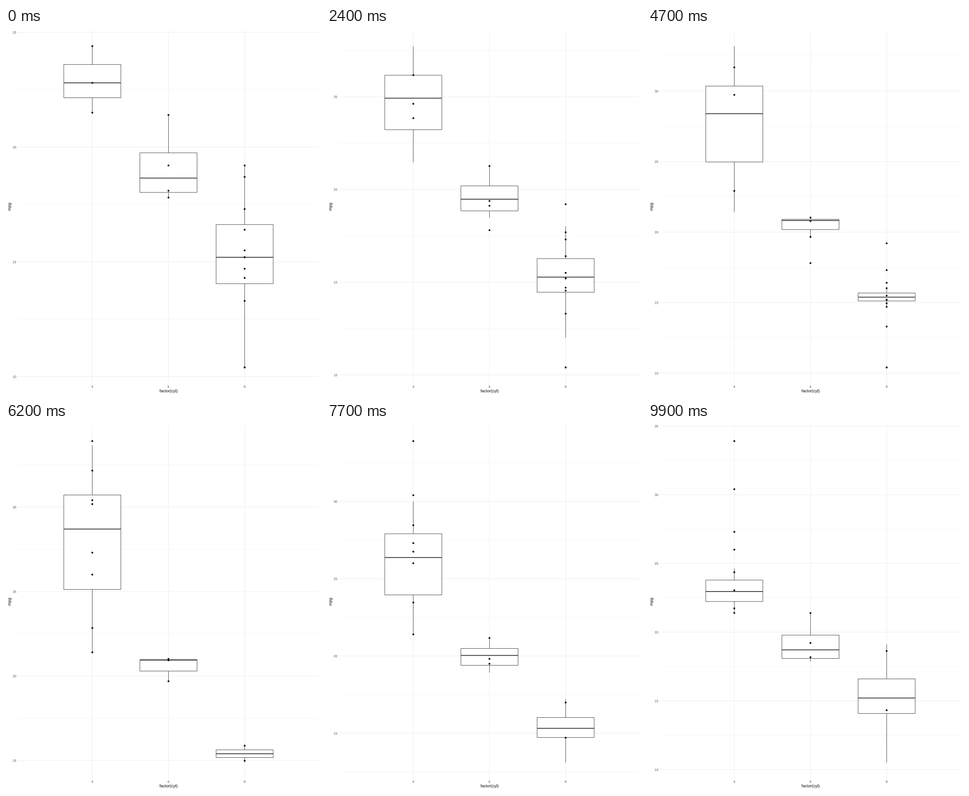
Write a matplotlib script that moves like this. It is 693 px wide and 808 px high and loops after 10 s.

```python
import numpy as np
import matplotlib.pyplot as plt
from matplotlib.animation import FuncAnimation
from matplotlib.patches import Circle, PathPatch, Rectangle
from matplotlib.textpath import TextPath
from matplotlib.transforms import Affine2D

plt.rcParams["path.snap"] = False

W, H, DPI = 693, 808, 64
FRAMES, INTERVAL = 100, 100
PX = 72 / DPI  # points per pixel

LEFT, RIGHT, TOP, BOTTOM = 26.5, 688.4, 4.5, 782.7
MID_X, MID_Y = (LEFT + RIGHT) / 2, (TOP + BOTTOM) / 2
STEP = (RIGHT - LEFT) / 3.95
HALF_BOX = 0.375 * STEP
CENTERS = [MID_X - STEP, MID_X, MID_X + STEP]

GRID, INK, AXIS_TEXT = "#EBEBEB", "#333333", "#4D4D4D"
THIN, LINE, THICK = 0.44, 0.88, 1.76
DOT, SMALL, TITLE = 2.0, 7.26, 9.08

# mpg per cylinder count (4, 6, 8) for both transmissions
AUTO = [
    [24.4, 22.8, 21.5],
    [21.4, 18.1, 19.2, 17.8],
    [18.7, 14.3, 16.4, 17.3, 15.2, 10.4, 10.4, 14.7, 15.5, 15.2, 13.3, 19.2],
]
MANUAL = [
    [22.8, 32.4, 30.4, 33.9, 27.3, 26.0, 30.4, 21.4],
    [21.0, 21.0, 19.7],
    [15.8, 15.0],
]


def lerp(a, b, t):
    return a + (b - a) * t


def phase(frame):
    """Start state, end state and linear progress between them."""
    if frame <= 10:
        return AUTO, AUTO, 0
    if frame < 50:
        return AUTO, MANUAL, (frame - 10) / 40
    if frame <= 61:
        return MANUAL, MANUAL, 0
    return MANUAL, AUTO, (frame - 61) / 39


def five_numbers(values):
    return np.percentile(values, [0, 25, 50, 75, 100])


def blend_points(a, b, t):
    # unmatched points wait in place until the transition ends
    return [lerp(p, q, t) for p, q in zip(a, b)] + a[len(b):]


fig = plt.figure(figsize=(W / DPI, H / DPI), dpi=DPI, facecolor="white")
ax = fig.add_axes([0, 0, 1, 1])


def segment(x0, y0, x1, y1, color, width):
    ax.plot([x0, x1], [y0, y1], color=color, lw=width * PX,
            solid_capstyle="butt", zorder=1)


def label(x, y, text, size, color, align=0.5, angle=0):
    path = TextPath((0, 0), text, size=size, prop={"family": "Liberation Sans"})
    box = path.get_extents()
    shift = -align * (box.x0 + box.x1) if align == 0.5 else -box.x1
    place = Affine2D().translate(shift, 0).rotate_deg(angle).scale(1, -1).translate(x, y)
    ax.add_patch(PathPatch(place.transform_path(path), fc=color, lw=0))


def draw_grid(low, high, to_y):
    for v in np.arange(2.5, 40, 5):
        if low <= v <= high:
            segment(LEFT, to_y(v), RIGHT, to_y(v), GRID, THIN)
    for v in range(5, 40, 5):
        if low <= v <= high:
            y = to_y(v)
            segment(LEFT, y, RIGHT, y, GRID, LINE)
            label(22.4, y + 2.9, str(v), SMALL, AXIS_TEXT, align=1)
    for x, cyl in zip(CENTERS, "468"):
        segment(x, TOP, x, BOTTOM, GRID, LINE)
        label(x, 792.2, cyl, SMALL, AXIS_TEXT)


def draw_box(x, stats, to_y):
    y_min, y_q1, y_med, y_q3, y_max = map(to_y, stats)
    segment(x, y_q3, x, y_max, INK, LINE)
    segment(x, y_q1, x, y_min, INK, LINE)
    ax.add_patch(Rectangle((x - HALF_BOX, y_q3), 2 * HALF_BOX, y_q1 - y_q3,
                           fc="white", ec=INK, lw=LINE * PX, joinstyle="miter",
                           zorder=1))
    segment(x - HALF_BOX, y_med, x + HALF_BOX, y_med, INK, THICK)


def draw(frame):
    a, b, t = phase(frame)
    boxes = [lerp(five_numbers(p), five_numbers(q), t) for p, q in zip(a, b)]
    dots = [blend_points(p, q, t) for p, q in zip(a, b)]

    everything = np.concatenate(boxes + dots)
    low, high = everything.min(), everything.max()
    pad = 0.05 * (high - low)
    low, high = low - pad, high + pad

    def to_y(v):
        return BOTTOM - (v - low) / (high - low) * (BOTTOM - TOP)

    ax.clear()
    ax.axis("off")
    draw_grid(low, high, to_y)
    for x, stats in zip(CENTERS, boxes):
        draw_box(x, stats, to_y)
    for x, values in zip(CENTERS, dots):
        for v in values:
            ax.add_patch(Circle((x, to_y(v)), DOT, fc="black", lw=0, zorder=3))
    label(MID_X, 802, "factor(cyl)", TITLE, "black")
    label(10.4, MID_Y, "mpg", TITLE, "black", angle=90)
    ax.set(xlim=(0, W), ylim=(H, 0))
    return ax.get_children()


anim = FuncAnimation(fig, draw, frames=FRAMES, interval=INTERVAL,
                     repeat=True, repeat_delay=0, blit=False)
plt.show()
```
